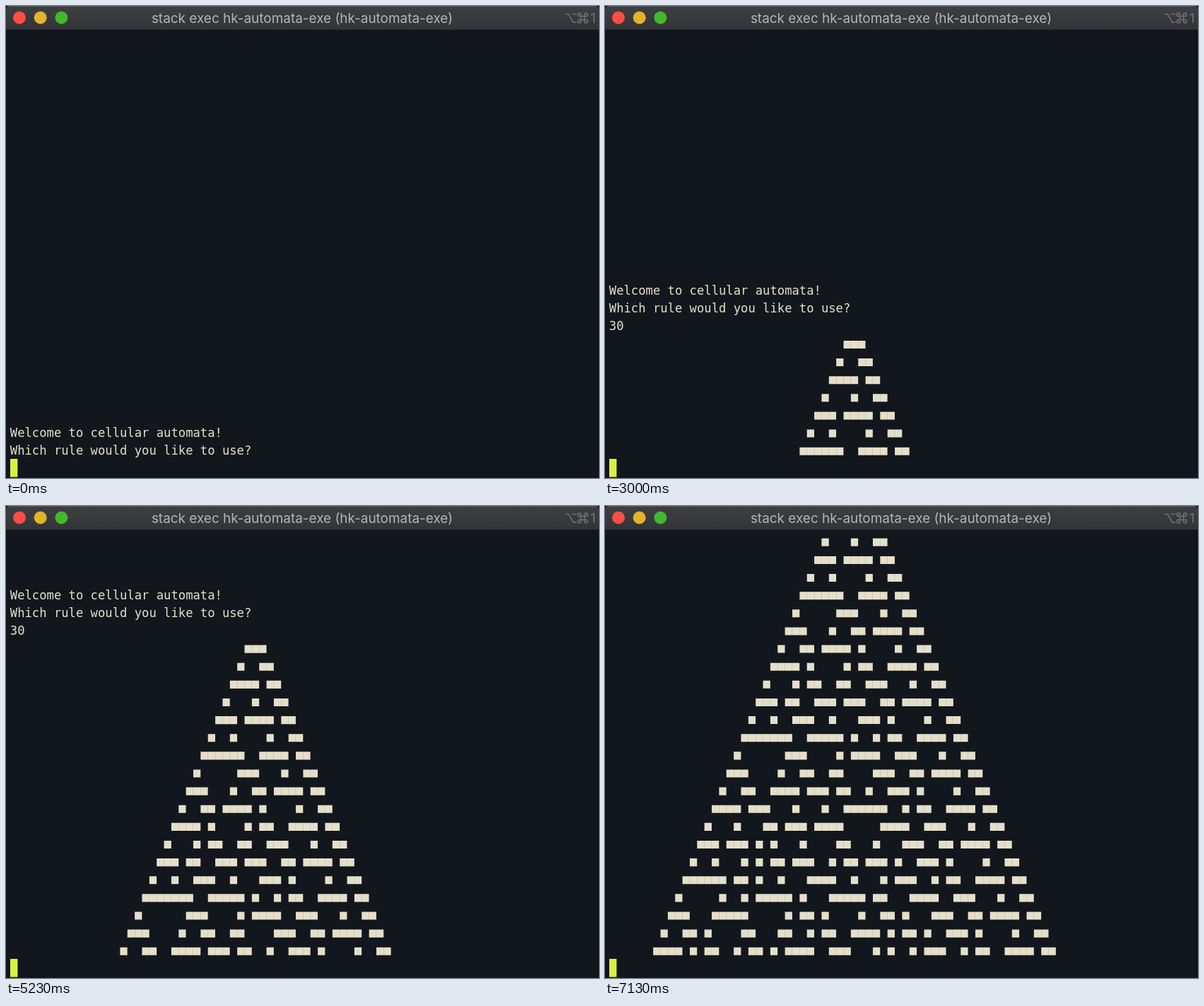
Recreate the animation shown at these times as an HTML page. Size 839x667 px, loop 7330 ms.

```html
<!DOCTYPE html>
<html lang="en">
<head>
<meta charset="utf-8">
<title>Cellular automata</title>
<style>
  html, body { margin: 0; width: 100%; height: 100%; overflow: hidden; background: #12171d; }
  svg { display: block; width: 839px; height: 667px; }
  .term { font: 17.2px "DejaVu Sans Mono", monospace; fill: #e5dfca; }
  .title { font: 18.95px Inter, sans-serif; fill: #b5b5b7; }
  .keys { fill: none; stroke: #707174; stroke-width: 1.6; }
  .hint { font: 18.95px Inter, sans-serif; fill: #707174; }
</style>
</head>
<body>
<svg viewBox="0 0 839 667">
  <defs>
    <linearGradient id="bar" x2="0" y2="1">
      <stop stop-color="#3e3f43"/>
      <stop offset="1" stop-color="#333438"/>
    </linearGradient>
  </defs>
  <rect width="839" height="667" fill="#12171d"/>
  <g class="term">
    <g id="scroll">
      <text x="5.8" y="609.2">Welcome to cellular automata!</text>
      <text x="5.8" y="634.3">Which rule would you like to use?</text>
      <text x="5.8" y="659.4" id="answer"></text>
    </g>
  </g>
  <rect id="cursor" x="6" y="640" width="10.4" height="25.6" fill="#d9f042"/>

  <path d="M0 33V5a5 5 0 0 1 5-5H834a5 5 0 0 1 5 5V33z" fill="url(#bar)"/>
  <path d="M4 .5H835" stroke="#58595c"/>
  <path d="M0 33.5H839" stroke="#1f2226"/>
  <circle cx="19" cy="16.5" r="9" fill="#fe4e45"/>
  <circle cx="48.7" cy="16.5" r="9" fill="#e3b427"/>
  <circle cx="78.4" cy="16.5" r="9" fill="#42b92b"/>
  <text class="title" x="419" y="23.5" text-anchor="middle">stack exec hk-automata-exe (hk-automata-exe)</text>
  <g class="keys">
    <path d="M791.5 11.5h4.5l6.5 11.5h4.5M800.5 11.5h6.5"/>
    <path transform="translate(816 17)" d="M-2.5 4.7V-4.7a2.2 2.2 0 1 0-2.2 2.2H4.7a2.2 2.2 0 1 0-2.2-2.2V4.7a2.2 2.2 0 1 0 2.2-2.2H-4.7a2.2 2.2 0 1 0 2.2 2.2z"/>
  </g>
  <text class="hint" x="834.5" y="23.5" text-anchor="end">1</text>
</svg>
<script>
  const LOOP = 7330, RULE = 30, CENTER = 33;
  const CELL = 10.36, LINE = 25.125, LEFT = 6;
  const FIRST_ROW_TOP = 673.9;
  const KEY_TIMES = [1000, 1070], ENTER = 1670;
  const ROW_TIMES = [
    1800, 2000, 2230, 2400, 2600, 2800, 3000, 3200, 3400,
    3600, 3800, 4000, 4230, 4430, 4630, 4830, 5030, 5230,
    5400, 5630, 5930, 6170, 6370, 6570, 6770, 6930, 7130
  ];

  const $ = id => document.getElementById(id);
  const scroll = $('scroll'), answer = $('answer'), cursor = $('cursor');

  // The right neighbour is the high bit, so the pattern is mirrored.
  const evolve = cells => cells.map((cell, i) =>
    RULE >> ((cells[i + 1] || 0) * 4 + cell * 2 + (cells[i - 1] || 0)) & 1);

  let cells = Array.from({ length: 80 }, (_, i) => +(i === CENTER));
  const rows = ROW_TIMES.map((_, n) => {
    cells = evolve(cells);
    const path = document.createElementNS('http://www.w3.org/2000/svg', 'path');
    const y = FIRST_ROW_TOP + LINE * n;
    path.setAttribute('d', cells.map((on, col) =>
      on ? `M${(LEFT + col * CELL).toFixed(2)} ${y.toFixed(2)}h10.25v11.1h-10.25z` : '').join(''));
    return scroll.appendChild(path);
  });

  const countPast = (times, t) => times.filter(time => time <= t).length;

  function render(t) {
    const typed = countPast(KEY_TIMES, t);
    const shown = countPast(ROW_TIMES, t);
    const entered = t >= ENTER;
    answer.textContent = '30'.slice(0, typed);
    cursor.setAttribute('x', LEFT + (entered ? 0 : typed * CELL));
    scroll.setAttribute('transform', `translate(0 ${-LINE * (shown + entered)})`);
    rows.forEach((row, n) => row.setAttribute('visibility', n < shown ? 'visible' : 'hidden'));
  }

  const start = performance.now();
  function frame() {
    render((performance.now() - start) % LOOP);
    requestAnimationFrame(frame);
  }
  frame();
</script>
</body>
</html>
```
